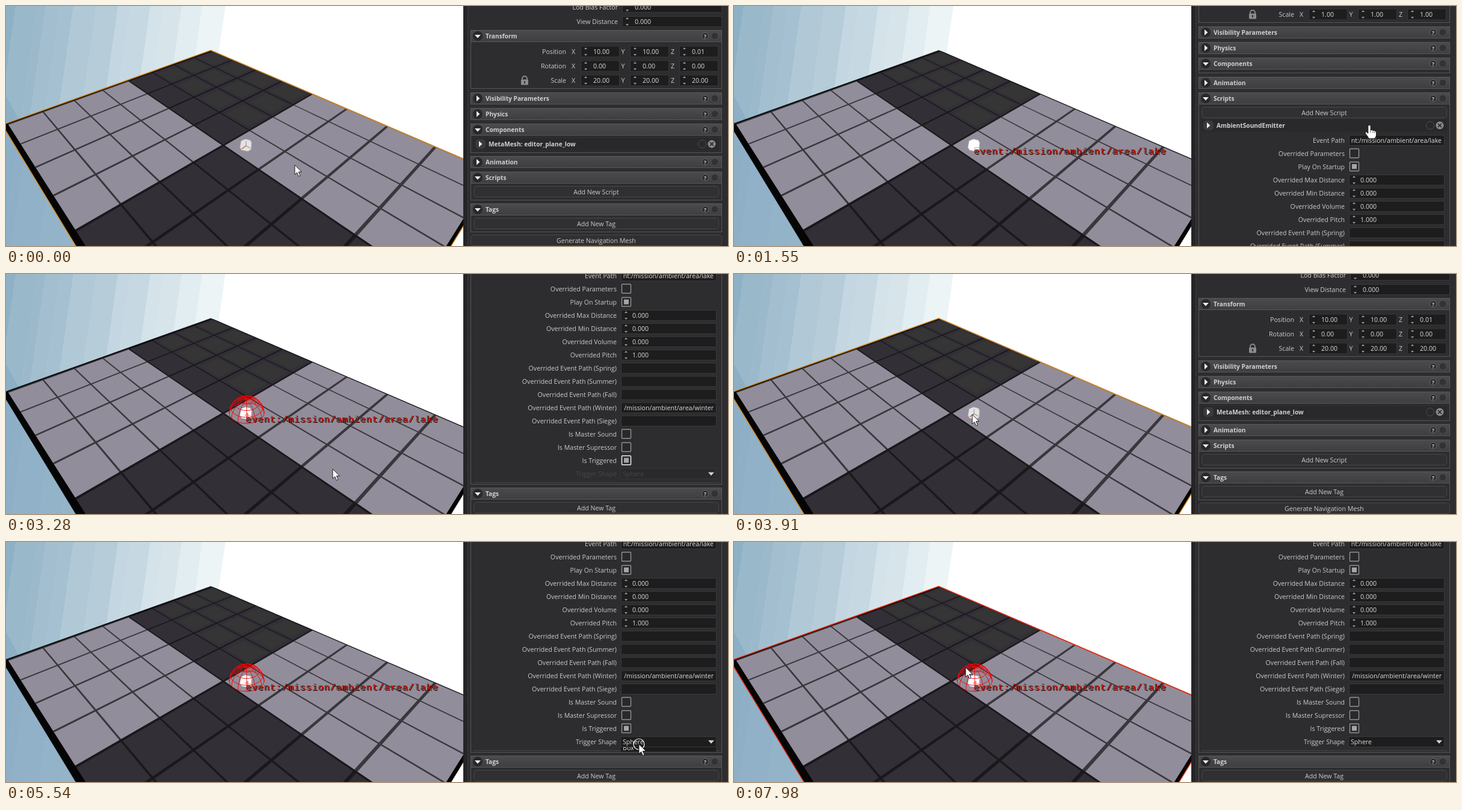
An HTML page that plays this animation: 1200 px wide and 400 px high, repeating every 8000 ms.

```html
<!DOCTYPE html>
<html lang="en">
<head>
<meta charset="utf-8">
<title>Scene editor</title>
<style>
html, body { margin: 0; width: 100%; height: 100%; overflow: hidden; background: #fff; }
svg { display: block; width: 1200px; height: 400px; }
text { font: 10.65px "Open Sans", "Noto Sans", sans-serif; fill: #cbcbcb; }
.bold { font-weight: 700; font-size: 10.2px; fill: #d0d0d0; }
.end { text-anchor: end; }
.mid { text-anchor: middle; }
.value { fill: #dcdcdc; }
.event { font: 15px "Liberation Mono", "DejaVu Sans Mono", monospace; letter-spacing: 1px; }
</style>
</head>
<body>
<svg id="stage" viewBox="0 0 1200 400"></svg>
<script>
const LOOP = 8000, STEP = 90, SCROLL = 331;

// ---------- small markup helpers ----------
const rect = (x, y, w, h, fill, more = '') => `<rect x="${x}" y="${y}" width="${w}" height="${h}" fill="${fill}" ${more}/>`;
const circle = (x, y, r, fill, more = '') => `<circle cx="${x}" cy="${y}" r="${r}" fill="${fill}" ${more}/>`;
const path = (d, fill, more = '') => `<path d="${d}" fill="${fill}" ${more}/>`;
const text = (x, y, s, cls = '', more = '') => `<text x="${x}" y="${y + 4}" class="${cls}" ${more}>${s}</text>`;
const group = (id, body, more = '') => `<g id="${id}" ${more}>${body}</g>`;
const line = points => 'M' + points.map(p => p.map(n => n.toFixed(1)).join()).join('L');
const range = n => [...Array(n).keys()];

// ---------- viewport ----------
// Perspective of the floor: four big tiles, u runs right, v runs left.
function floor(u, v) {
  const s = u / 2, t = v / 2, w = 1 - .448 * s - .308 * t;
  return [(343 + 103.6 * s - 340.5 * t) / w, (75 + 77.35 * s + 61.5 * t) / w];
}
const quad = (u0, v0, u1, v1) =>
  line([floor(u0, v0), floor(u1, v0), floor(u1, v1), floor(u0, v1)]) + 'Z';

function sky() {
  const edges = [0, 16, 52, 66, 90, 112, 150, 186, 206, 240, 262, 292, 312, 326, 364];
  const stops = [[143, 177, 198], [163, 191, 207], [185, 207, 219], [212, 227, 234], [236, 244, 246]];
  const shade = k => {
    const f = Math.max(0, Math.min(k, .999)) * 4, i = Math.floor(f);
    return stops[i].map((c, n) => Math.round(c + (stops[i + 1][n] - c) * (f - i)));
  };
  return rect(0, 0, 760, 400, '#fff') + edges.slice(0, -1).map((x, i) => {
    const x1 = edges[i + 1], wobble = i % 2 ? .025 : -.025;
    const low = x => x ? x - 56 : -60;
    return path(`M${x},0H${x1 + .5}L${low(x1)},400H${low(x)}Z`,
      `rgb(${shade((x + x1) / 2 / 345 + wobble)})`);
  }).join('') + path('M0,150L60,260L130,400H0Z', '#8aadc4', 'opacity=".75"');
}

function tiles() {
  let out = path(quad(-.02, 0, 2.012, 2.035), '#050505');
  for (const [u, v] of [[0, 0], [0, 1], [1, 0], [1, 1]]) {
    const light = u !== v;
    out += path(quad(u, v, u + 1, v + 1), light ? '#928d9a' : '#322f36');
    if (!u && !v) {
      for (const i of range(16)) {
        const a = (i % 4) / 4, b = Math.floor(i / 4) / 4;
        if (b < .6) out += path(quad(a + .04, b + .03, a + .22, b + .22), '#353535');
      }
    }
    const ink = light ? '#39363c' : '#1a181c';
    for (const i of range(4)) {
      const a = u + i / 4, b = v + i / 4;
      out += path(quad(a - .006, v, a + .007, v + 1), ink) + path(quad(u, b - .005, u + 1, b + .006), ink);
    }
  }
  return out + path(quad(0, .994, 2, 1.004), '#1a181c') + path(quad(.994, 0, 1.004, 2), '#1a181c');
}

function dome() {
  const R = 29, tilt = .63;
  const at = (lat, lon) => [400 + R * Math.cos(lat) * Math.cos(lon),
    232 - R * (Math.sin(lat) * Math.cos(tilt) + Math.cos(lat) * Math.sin(lon) * Math.sin(tilt))];
  const rings = range(4).map(i => line(range(33).map(k => at(i * Math.PI / 8, k * Math.PI / 16))));
  const ribs = range(12).map(i => line(range(9).map(k => at(k * Math.PI / 16, i * Math.PI / 6))));
  return path(rings.concat(ribs).join(''), 'none', 'stroke="#f00505" stroke-width=".9"') +
    path(line(range(33).map(k => [400 + 29 * Math.cos(k * Math.PI / 32), 232 - 29 * Math.sin(k * Math.PI / 32)])),
      'none', 'stroke="#f00505"');
}

const cube = (fill, edge) => path('M391,225L398,222L406,224L408,228L407,239L402,242L392,240L389,236Z', fill,
  `stroke="${edge}" stroke-linejoin="round"`);
const axes = path('M399,233V225', 'none', 'stroke="#8fa3c0" stroke-width="1.3"') +
  path('M399,233L392,238', 'none', 'stroke="#d4553c" stroke-width="1.5"') +
  path('M399,233L406,237', 'none', 'stroke="#78a98b" stroke-width="1.3"');

const eventLabel = [['#1a0000', 1, 1], ['#1a0000', -.5, 0], ['#f32411', 0, 0]].map(([c, x, y]) =>
  `<text class="event" x="${399 + x}" y="${247 + y}" style="fill:${c}">event:/mission/ambient/area/lake</text>`).join('');

const viewport = sky() + tiles() +
  path(quad(-.02, 0, 2.012, 2.035), 'none', 'id="outline" stroke-width="1.4"') +
  group('planeIcon', cube('#e6e3e3', '#c9c5c8') + axes) +
  group('emitterIcon', cube('#fff', '#dedede') + path('M400,242V236H407', 'none', 'stroke="#aaa"')) +
  group('dome', dome() + path('M397,236L402,232V242', 'none', 'stroke="#e33"')) +
  group('eventLabel', eventLabel);

// ---------- property panel ----------
const arrow = (x, y, open) => path(open ? `M${x - 5},${y - 2}h10l-5,5.5z` : `M${x - 2},${y - 5}v10l5.5,-5z`, '#eee');
const frame = (y0, y1) => rect(772.5, y0 + .5, 417, y1 - y0, 'none', 'stroke="#565658"');

function header(y, label, open = false) {
  return rect(772.5, y - 9.5, 417, 19, 'url(#bar)', 'stroke="#59595b"') +
    circle(784, y, 8, '#28282a') + arrow(784, y, open) + text(797, y, label, 'bold') +
    circle(1162, y, 5.5, '#2c2c2e', 'stroke="#686868"') +
    text(1162, y - .5, '?', 'mid', 'style="font-size:8.5px;font-weight:700"') +
    circle(1178, y, 6, '#323234', 'stroke="#505052"');
}
const subHeader = (y, label) => rect(777, y - 10, 408, 20, '#29292b') +
  rect(780, y - 8, 17, 16, '#3a3a3c', 'rx="5"') + arrow(788, y, false) + text(802, y, label, 'bold') +
  circle(1157, y, 6.5, '#29292b', 'stroke="#505052"') + circle(1173, y, 6.5, '#8a8a8a') +
  path(`M1170,${y - 3}l6,6m0,-6l-6,6`, 'none', 'stroke="#222" stroke-width="1.6"');
const button = (y, label, x = 777, w = 408) =>
  rect(x + .5, y - 9.5, w - 1, 18, '#303032', 'rx="5" stroke="#48484a"') + text(981, y, label, 'mid');
const field = (x, y, w, h = 18) => rect(x + .5, y - h / 2 + .5, w - 1, h - 1, '#1d1d1e', 'stroke="#38383a"');
const spinner = (x, y) => path(`M${x - 2.5},${y - 4}l2.5,-3l2.5,3zM${x - 2.5},${y + 4}l2.5,3l2.5,-3z`, '#999');
const number = (x, y, w, value, gap = 13, h = 18) =>
  field(x, y, w, h) + spinner(x + 8.5, y) + text(x + 8 + gap, y, value, 'value');
const vector = (y, label, values) => text(931, y, label, 'end') + values.map((v, i) =>
  text(943 + i * 82.5, y, 'XYZ'[i], 'mid') + number(955 + i * 82, y, 65, v, 13, 19)).join('');
const row = (y, label, body) => text(1015, y, label, 'end') + body;
const check = (y, on) => rect(1023.5, y - 8, 15, 15, '#29292b', 'stroke="#939393" stroke-width="1.4" rx="1"') +
  (on ? rect(1027, y - 4.5, 8, 8, '#a5a5a5') : '');

const common = (position, scale) =>
  text(1017, 2, 'Lod Bias Factor', 'end') + number(1024, 2, 166, '0.000') +
  text(1017, 26, 'View Distance', 'end') + number(1024, 26, 166, '0.000') +
  frame(40, 137) + header(50, 'Transform', true) +
  vector(76, 'Position', position) + vector(100, 'Rotation', ['0.00', '0.00', '0.00']) + vector(124, 'Scale', scale) +
  path('M858,123v-2a4,4 0 0 1 8,0v2', 'none', 'stroke="#8c8c8c" stroke-width="1.8"') +
  rect(856, 122.5, 12, 9, '#8c8c8c', 'rx="1"') + rect(861, 125, 2, 4, '#333') +
  header(154, 'Visibility Parameters') + header(180, 'Physics');

const planePanel = common(['10.00', '10.00', '0.01'], ['20.00', '20.00', '20.00']) +
  frame(196, 244) + header(206, 'Components', true) + subHeader(230, 'MetaMesh: editor_plane_low') +
  header(260, 'Animation') +
  frame(276, 323) + header(286, 'Scripts', true) + button(310, 'Add New Script') +
  frame(329, 376) + header(339, 'Tags', true) + button(363, 'Add New Tag') +
  button(391, 'Generate Navigation Mesh', 772, 418);

const numbers = [['Max Distance', '0.000'], ['Min Distance', '0.000'], ['Volume', '0.000'], ['Pitch', '1.000']];
const seasons = ['Spring', 'Summer', 'Fall', 'Winter', 'Siege'];
const emitterPanel = common(['11.07', '9.13', '0.01'], ['1.00', '1.00', '1.00']) +
  path('M788,72h4a3.3,3.3 0 1 1 -3,5', 'none', 'stroke="#c4c4c4" stroke-width="1.6"') + path('M786,72l4,-3.5v7z', '#c4c4c4') +
  frame(196, 221) + header(206, 'Components', true) +
  group('hoverBar', rect(773, 197, 416, 18, '#fff', 'opacity=".08"')) +
  header(238, 'Animation') +
  frame(254, 681) + header(264, 'Scripts', true) + button(288, 'Add New Script') +
  subHeader(309, 'AmbientSoundEmitter') + path('M777,678.5H1185', 'none', 'stroke="#454547"') +
  row(334, 'Event Path', field(1022, 334, 159) + text(1176, 334, 'nt:/mission/ambient/area/lake', 'end value')) +
  row(356, 'Overrided Parameters', check(356)) + row(378, 'Play On Startup', check(378, true)) +
  numbers.map(([n, v], i) => row(400 + 22 * i, 'Overrided ' + n, number(1022, 400 + 22 * i, 159, v, 11))).join('') +
  seasons.map((n, i) => row(488 + 22 * i, `Overrided Event Path (${n})`, field(1022, 488 + 22 * i, 159) +
    (n === 'Winter' ? text(1176, 554, '/mission/ambient/area/winter', 'end value') : ''))).join('') +
  row(598, 'Is Master Sound', check(598)) + row(620, 'Is Master Supressor', check(620)) +
  row(642, 'Is Triggered', check(642) + group('triggered', rect(1027, 637.5, 8, 8, '#a5a5a5')) +
    rect(1023.5, 634, 15, 15, 'none', 'id="focus" stroke="#d8d8d8" stroke-width="1.6" rx="1"')) +
  group('shapeOff', text(1015, 664, 'Trigger Shape', 'end', 'style="fill:#474749"') +
    rect(1021.5, 654.5, 159, 18, '#2a2a2c', 'stroke="#363638"') + text(1025, 664, 'Sphere', '', 'style="fill:#474749"')) +
  group('shapeOn', text(1015, 664, 'Trigger Shape', 'end') + field(1021, 664, 160) + text(1025, 664, 'Sphere', 'value')) +
  path('M1167,661.5h10l-5,5.5z', '#d6d6d6') +
  frame(687, 734) + header(697, 'Tags', true) + button(721, 'Add New Tag');

const popup = group('popup', rect(1022, 343, 158, 26, '#1c1c1d') + rect(1022, 343, 158, 13, '#434345', 'id="choice"') +
  text(1025, 349, 'Sphere', 'value') + text(1025, 362, 'Box', 'value'));

const panel = rect(760, 0, 440, 400, '#2d2d2f') + rect(760, 0, 7, 400, '#252527') +
  path('M767.5,0V400', 'none', 'stroke="#4a4a4c" stroke-dasharray="2 2"') +
  group('planePanel', planePanel) + group('emitterPanel', emitterPanel) + `<g clip-path="url(#under)">${popup}</g>`;

const pointer = group('pointer',
  group('arrow', circle(0, 0, 9, 'none', 'id="press" stroke="#fff" stroke-width="1.2"') +
    path('M0,0V16L3.7,12.6L6.4,18.8L9,17.7L6.3,11.6H11.4Z', '#fff', 'stroke="#111" stroke-width=".9"')) +
  group('hand', path('M-2.2,1.5a2.2,2.2 0 0 1 4.4,0V8q2.5,-1.3 3.8,.4q2.2,-.7 3.2,.9q2.4,-.3 2.4,2.2V16q-.3,3 -2,4.5V22H-1.5V20.5L-6.5,13.5q-1.2,-2.2 .6,-2.8q1.5,-.3 3.7,2.5Z',
    '#fff', 'stroke="#111"') + path('M2.2,8v4M6,9v3.5M9,10v3', 'none', 'stroke="#333" stroke-width=".8"')));

const stage = document.getElementById('stage');
stage.innerHTML = `<defs>
  <linearGradient id="bar" x2="0" y2="1"><stop stop-color="#4b4b4d"/><stop offset="1" stop-color="#3e3e40"/></linearGradient>
  <clipPath id="view"><rect width="760" height="400"/></clipPath>
  <clipPath id="under"><rect x="1021" y="342" width="160" height="58"/></clipPath>
</defs><g clip-path="url(#view)">${viewport}</g>${panel}${pointer}`;
const el = {};
stage.querySelectorAll('[id]').forEach(e => el[e.id] = e);

// ---------- timeline ----------
// Share of a stepped move done at time t, moving on the first step already.
const stepped = (t, start, steps) => Math.max(0, Math.min(steps, Math.floor((t - start) / STEP) + 1)) / steps;
const within = (t, a, b) => t >= a && t < b;

// start, steps, target x, target y
const moves = [[90, 5, 396, 234], [820, 4, 1056, 199], [2100, 5, 1035, 311], [2920, 5, 543, 325],
  [3550, 5, 396, 234], [4090, 4, 480, 244], [4450, 2, 1040, 243], [4900, 4, 1052, 337],
  [5990, 3, 1052, 357], [6540, 4, 1040, 350], [6990, 7, 338, 205], [7710, 4, 385, 209]];

function pointerAt(t) {
  let x = 480, y = 265;
  for (const [start, steps, tx, ty] of moves) {
    const k = stepped(t, start, steps), e = k * k * (3 - 2 * k);
    x += (tx - x) * e;
    y += (ty - y) * e;
  }
  return [x, y];
}

const show = (name, on) => el[name].setAttribute('display', on ? 'inline' : 'none');

function draw(t) {
  const [x, y] = pointerAt(t);
  const plane = t < 820 || within(t, 3550, 4000);
  const hover = within(t, 3370, 3550) || within(t, 4270, 4540) || (t >= 7260 && x < 760);
  const scroll = t < 4000 ? stepped(t, 1550, 3) : stepped(t, 4540, 3);
  const open = stepped(t, 5540, 4) - stepped(t, 6540, 3);

  el.outline.setAttribute('stroke', plane ? '#d98a1c' : hover ? '#f5300f' : '#111');
  el.outline.setAttribute('stroke-width', plane || hover ? 1.5 : .8);
  el.outline.setAttribute('stroke-dasharray', plane || hover ? 'none' : '2 1');
  show('planeIcon', plane);
  show('emitterIcon', !plane);
  show('eventLabel', !plane);
  show('dome', !plane && t >= 3010);

  show('planePanel', plane);
  show('emitterPanel', !plane);
  el.emitterPanel.setAttribute('transform', `translate(0 ${Math.round(-SCROLL * scroll)})`);
  show('hoverBar', within(t, 1090, 1550));
  show('triggered', t >= 2920);
  show('focus', within(t, 2920, 3550));
  show('shapeOff', t < 4000);
  show('shapeOn', t >= 4000);

  show('popup', open > 0);
  el.popup.setAttribute('transform', `translate(0 ${-26 * (1 - open)})`);
  show('choice', t >= 5990 && y >= 343);
  el.choice.setAttribute('y', y >= 356 ? 356 : 343);

  const hand = within(t, 1000, 3100) && x > 760;
  el.pointer.setAttribute('transform', `translate(${x.toFixed(1)} ${y.toFixed(1)})`);
  show('hand', hand);
  show('arrow', !hand);
  show('press', within(t, 5540, 5630) || within(t, 6450, 6540));
}

const began = performance.now();
function tick() {
  draw((performance.now() - began) % LOOP);
  requestAnimationFrame(tick);
}
draw(0);
requestAnimationFrame(tick);
</script>
</body>
</html>
```
